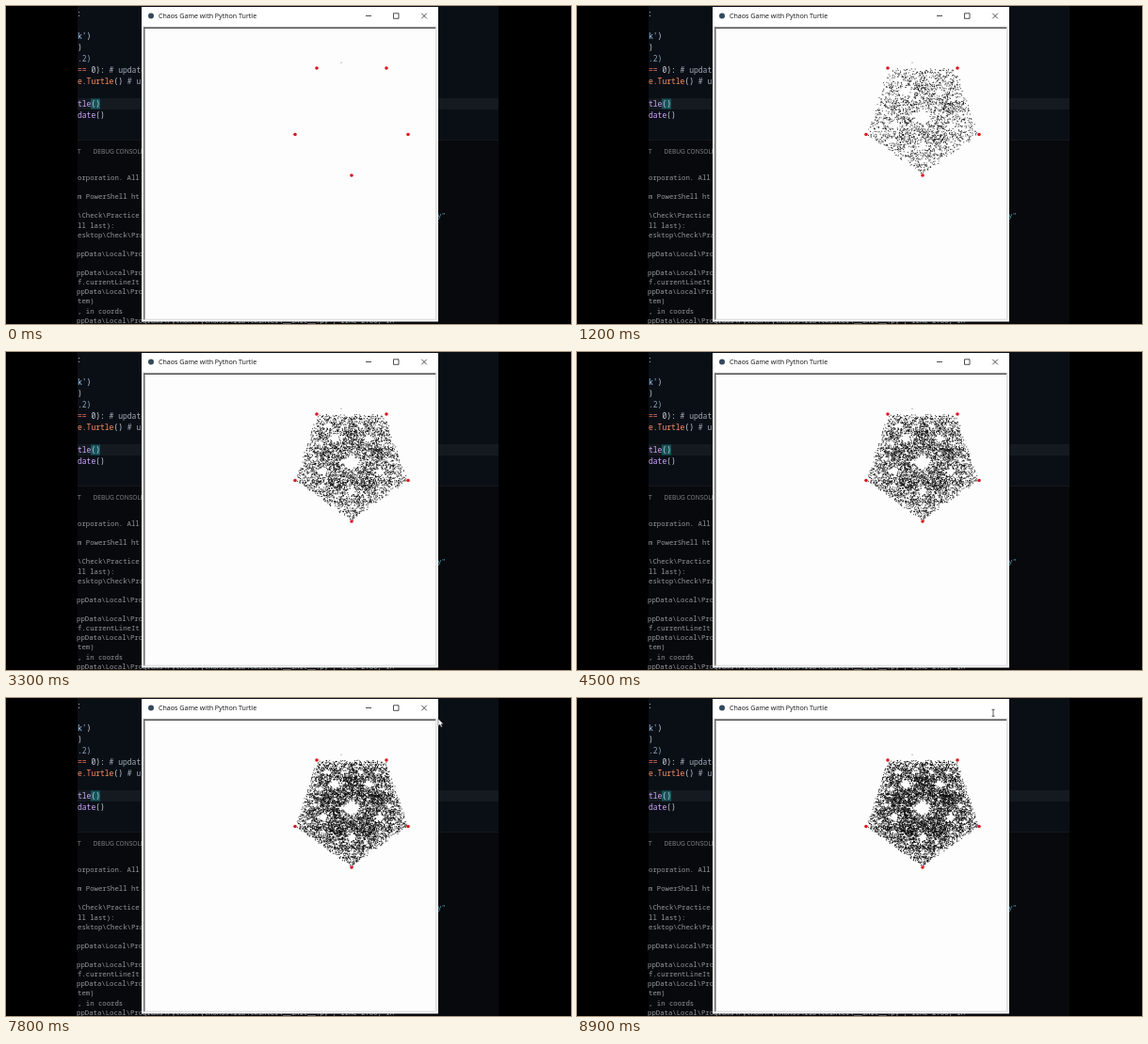
Write an HTML page with a canvas that moves like this. It is 600 px wide and 338 px high and loops after 9000 ms.

```html
<!DOCTYPE html>
<html lang="en">
<head>
<meta charset="utf-8">
<title>Chaos game</title>
<style>
  html, body { margin: 0; width: 100%; height: 100%; overflow: hidden; background: #000; }
  svg, canvas { position: absolute; left: 0; top: 0; width: 600px; height: 338px; }
  text { white-space: pre; }
  .code { font: 8px "Noto Sans Mono", "DejaVu Sans Mono", monospace; fill: #c9d1d9; }
  .term { font: 7.3px "Noto Sans Mono", "DejaVu Sans Mono", monospace; fill: #96989c; }
  .tabs { font: 6.6px "Open Sans", "Noto Sans", sans-serif; fill: #85898f; }
  .title { font: 7.1px "Open Sans", "Noto Sans", sans-serif; fill: #111; }
  .red { fill: #f4705f; } .num { fill: #8fa3b5; } .str { fill: #a5d6ff; }
  .note { fill: #a3abb5; } .type { fill: #fb8f62; } .call { fill: #d2a8ff; }
</style>
</head>
<body>
<svg viewBox="0 0 600 338">
  <rect x="76" width="447" height="142" fill="#0a0f16"/>
  <rect x="76" y="98" width="447" height="12" fill="#151a21"/>
  <rect x="76" y="142" width="447" height="196" fill="#08090d"/>
  <path d="M76 142.5H523" stroke="#14181e"/>
  <rect x="90" y="98.5" width="10" height="11" fill="#17535a"/>

  <g class="code">
    <text x="75" y="11">:</text>
    <text x="76" y="35"><tspan class="str">k'</tspan>)</text>
    <text x="76" y="47">)</text>
    <text x="76" y="59" class="num">.2)</text>
    <text x="76" y="71"><tspan class="red">==</tspan> 0): <tspan class="note"># update</tspan></text>
    <text x="76" y="83"><tspan class="type">e.Turtle</tspan>() <tspan class="note"># u</tspan></text>
    <text x="76" y="107"><tspan class="call">tle</tspan>()</text>
    <text x="76" y="119"><tspan class="call">date</tspan>()</text>
  </g>
  <g class="tabs">
    <text x="76" y="157">T</text>
    <text x="92.5" y="157">DEBUG CONSOLE</text>
  </g>
  <g class="term">
    <text x="76" y="185">orporation. All</text>
    <text x="76" y="205">m PowerShell ht</text>
    <text x="76" y="225">\Check\Practice</text>
    <text x="458" y="225" fill="#4fb3c4">y"</text>
    <text x="76" y="236">ll last):</text>
    <text x="76" y="246">esktop\Check\Pra</text>
    <text x="75" y="266">ppData\Local\Pro</text>
    <text x="75" y="286">ppData\Local\Pro</text>
    <text x="76" y="296">f.currentLineIt</text>
    <text x="75" y="306">ppData\Local\Pro</text>
    <text x="76" y="316">tem)</text>
    <text x="76" y="327">, in coords</text>
    <text x="75" y="337">ppData\Local\Programs\Python\Python39\lib\tkinter\__init__.py", line 2766, in</text>
  </g>

  <!-- window -->
  <rect x="144" y="1" width="315" height="334.5" fill="#f8f8f8"/>
  <rect x="144" y="1" width="315" height="20" fill="#fff"/>
  <rect x="147" y="23" width="309" height="310" fill="#fdfdfd"/>
  <path d="M146 23.2H456.5" stroke="#4c4c4c" stroke-width="1.6"/>
  <path d="M146.800 22.5V333.5" stroke="#6a6a6a" stroke-width="1.5"/>
  <path d="M147 333.2H456.700V23" fill="none" stroke="#d8d8d8"/>
  <circle cx="154" cy="10.5" r="3" fill="#34495c"/>
  <text class="title" x="162" y="13.2">Chaos Game with Python Turtle</text>
  <path id="buttons" d="M382 10.5h6M411.5 7.8h5.5v5.5h-5.5zM441.3 7.8l5.5 5.5m0-5.5l-5.5 5.5"
        fill="none" stroke="#222" stroke-width=".8"/>
</svg>
<canvas id="plot" width="600" height="338"></canvas>
<svg viewBox="0 0 600 338">
  <path id="arrow" d="M0 0V7.8L1.8 6.2L3 9L4.3 8.4L3.1 5.7H5.5Z" fill="#fff" stroke="#222" stroke-width=".5"/>
  <path id="beam" d="M440.5 12.3h3M442 12.3v7M440.5 19.3h3" fill="none" stroke="#333" stroke-width=".8"/>
</svg>
<script>
const LOOP = 9000, BATCH = 520, STEP = 100, FADE_STEPS = 3, DOT = .95;
// Each screen update takes longer as the drawing fills up.
const updates = [100, 300, 500, 800, 1100, 1500, 2000, 2500, 3000, 3800, 4500, 5200, 6000, 6900, 7800, 8700];
const corners = [[330, 66], [404, 66], [427, 136.5], [367, 180], [307, 136.5]];
const $ = id => document.getElementById(id);
const ctx = $("plot").getContext("2d");

let seed = 20;
function random() {
  seed = (seed * 1664525 + 1013904223) % 4294967296;
  return seed / 4294967296;
}

// Jump halfway to a random corner each time.
const points = [];
let x = 350, y = 110;
for (let i = 0; i < BATCH * updates.length; i++) {
  const [cx, cy] = corners[Math.floor(random() * 5)];
  x = (x + cx) / 2;
  y = (y + cy) / 2;
  points.push([x, y]);
}

function drawPlot(t) {
  ctx.clearRect(0, 0, 600, 338);
  ctx.fillStyle = "#777";
  ctx.fillRect(355.5, 59.7, 1, 1);
  ctx.fillStyle = "#000";
  // A new batch darkens over a few steps.
  updates.forEach((start, k) => {
    if (t < start) return;
    ctx.globalAlpha = .88 * Math.min(1, ((t - start) / STEP + 1) / FADE_STEPS);
    for (const [px, py] of points.slice(k * BATCH, (k + 1) * BATCH))
      ctx.fillRect(px - DOT / 2, py - DOT / 2, DOT, DOT);
  });
  ctx.globalAlpha = 1;
  ctx.fillStyle = "#dc1420";
  for (const [cx, cy] of corners) {
    ctx.beginPath();
    ctx.arc(cx, cy, 1.8, 0, 7);
    ctx.fill();
  }
}

const show = (id, on) => $(id).style.display = on ? "" : "none";
let drawn = -1;

function frame(now) {
  const t = Math.floor(now % LOOP / STEP) * STEP;
  if (t !== drawn) {
    drawPlot(drawn = t);
    const closing = t >= 8900;
    const move = Math.min(1, Math.max(0, (t - 7800) / 900));
    const ease = move * move * (3 - 2 * move);
    show("buttons", !closing);
    show("beam", closing);
    show("arrow", t >= 7800 && !closing);
    $("arrow").setAttribute("transform", `translate(${459 - 17 * ease} ${22 - 9 * ease})`);
  }
  requestAnimationFrame(frame);
}
frame(0);
</script>
</body>
</html>
```
